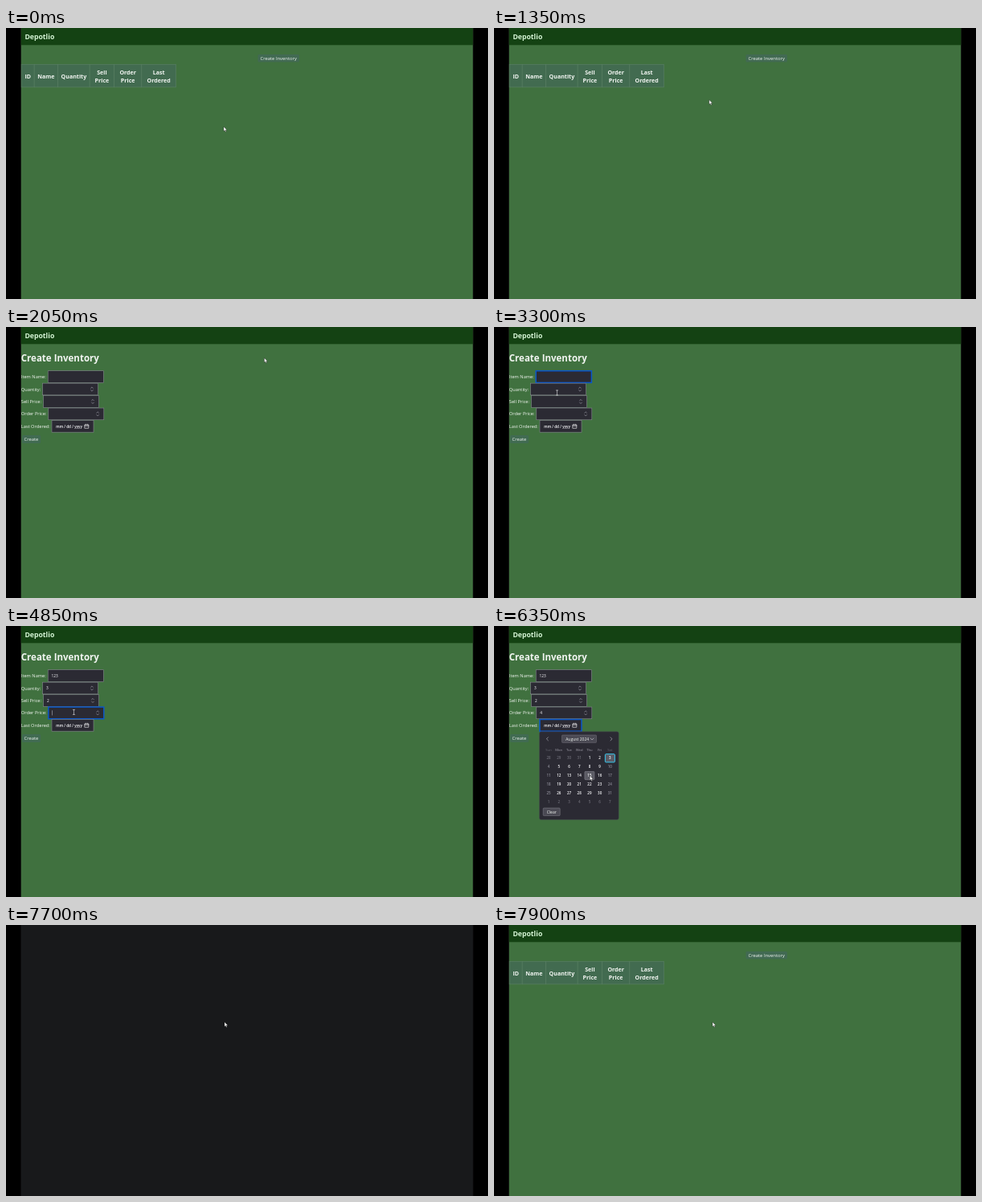
An HTML page for the animation above (8000 ms loop, 600 px wide and 338 px high).

```html
<!DOCTYPE html>
<html lang="en">
<head>
<meta charset="utf-8">
<title>Inventory form</title>
<style>
  html, body { margin: 0; width: 100%; height: 100%; overflow: hidden; background: #000; }
  svg { display: block; width: 100%; height: 100%; }
  text { font-family: "Open Sans", "Noto Sans", sans-serif; fill: #f1f5f1; }
  .bold { font-weight: 700; }
  .mid { text-anchor: middle; }
  .label { font-size: 5.7px; }
  .button { font-size: 5.85px; }
  .value { font-size: 4.75px; fill: #fbfbfe; }
  .date { font-size: 4.6px; font-weight: 600; fill: #fbfbfe; }
  .th { font-size: 7.1px; font-weight: 700; }
  .day { font-size: 4.5px; font-weight: 600; }
  .line { fill: none; stroke-linecap: round; stroke-linejoin: round; }
</style>
</head>
<body>
<svg id="stage" viewBox="0 0 600 338"></svg>
<script>
const LOOP = 8000, STEP = 50;
const NS = "http://www.w3.org/2000/svg";
const stage = document.getElementById("stage");

function add(parent, tag, attrs = {}, content) {
  const node = document.createElementNS(NS, tag);
  for (const key in attrs) node.setAttribute(key, attrs[key]);
  if (content !== undefined) node.textContent = content;
  parent.appendChild(node);
  return node;
}
const group = parent => add(parent, "g");
const rect = (parent, x, y, width, height, fill, more = {}) =>
  add(parent, "rect", { x, y, width, height, fill, ...more });
const text = (parent, x, y, content, cls, more = {}) =>
  add(parent, "text", { x, y, class: cls, ...more }, content);
const line = (parent, d, stroke, width) =>
  add(parent, "path", { d, stroke, "stroke-width": width, class: "line" });
const show = (node, on) => node.setAttribute("display", on ? "inline" : "none");

rect(stage, 0, 0, 600, 338, "#000");
const blank = rect(stage, 18.5, 0, 563, 338, "#1a191b");

// Shared page
const page = group(stage);
rect(page, 18.8, 0, 562.4, 338, "#40713f");
rect(page, 18.8, 0, 562.4, 21.3, "#144213");
text(page, 23.4, 13.8, "Depotlio", "bold", { "font-size": 8.7, style: "fill:#d5f5d5" });

// List page
const list = group(page);
rect(list, 313.5, 33, 51.5, 9.6, "#426a53", { rx: 1.5 });
text(list, 339.2, 39.9, "Create Inventory", "button mid");
const edges = [19.2, 35.2, 64.6, 104.2, 134.6, 168.8, 211.4];
["ID", "Name", "Quantity", "Sell Price", "Order Price", "Last Ordered"].forEach((name, i) => {
  const x = edges[i], w = edges[i + 1] - x, words = name.split(" ");
  rect(list, x, 45.4, w, 28.4, "#426b50", { stroke: "#577d62", "stroke-width": 0.7 });
  words.forEach((word, k) =>
    text(list, x + w / 2, words.length > 1 ? 57.5 + k * 10.2 : 62.6, word, "th mid"));
});

// Form page
const form = group(page);
text(form, 18.8, 43, "Create Inventory", "bold", { "font-size": 11.5 });

const fields = [
  { label: "Item Name:", x: 52.2, w: 69.2 },
  { label: "Quantity:", x: 45.6, w: 69, spin: true },
  { label: "Sell Price:", x: 46.6, w: 69, spin: true },
  { label: "Order Price:", x: 52.8, w: 69, spin: true },
  { label: "Last Ordered:", x: 57, w: 52, date: true }
];
fields.forEach((f, i) => {
  f.y = 54.7 + i * 15.45;
  f.h = 14.7;
  text(form, 18.8, f.y + 9.4, f.label, "label");
  f.box = rect(form, f.x, f.y, f.w, f.h, "#2b2a33");
  f.text = text(form, f.x + (f.date ? 5.3 : 4.4), f.y + 9.1, "", f.date ? "date" : "value");
  const right = f.x + f.w - 7.6, mid = f.y + f.h / 2;
  if (f.spin) line(form, `M${right - 1.4} ${mid - 1.2}l1.4 -1.4l1.4 1.4m-2.8 2.4l1.4 1.4l1.4 -1.4`, "#a5a5b0", 0.6);
  if (f.date) line(form, `M${right - 3.2} ${mid - 1.9}h4.6v4.3h-4.6zm0 1.3h4.6m-3.4 -2v0.7m2.2 -0.7v0.7`, "#fbfbfe", 0.6);
  f.caret = rect(form, 0, f.y + 4.2, 0.5, 6.2, "#c8c8d0");
});
rect(form, 20, 135, 23.2, 10, "#416b52", { rx: 1.5 });
text(form, 31.4, 142.1, "Create", "button mid");

// Date picker
const picker = group(form);
const colX = c => 68 + c * 12.73, rowY = r => 164.8 + r * 10.88;
rect(picker, 56.6, 131.8, 98.6, 109.8, "#2b2a33", { rx: 2, stroke: "#45444e", "stroke-width": 0.5 });
rect(picker, 84.5, 136, 43, 9.6, "#4a4953", { rx: 1, stroke: "#74737d", "stroke-width": 0.5 });
text(picker, 89.2, 142.6, "August 2024", "", { "font-size": 5 });
line(picker, "M120.2 140.1l1.9 1.9l1.9 -1.9", "#dcdce2", 0.6);
line(picker, "M67.4 138.8l-2 2l2 2M145 138.8l2 2l-2 2", "#c8c8d0", 0.6);
["Sun", "Mon", "Tue", "Wed", "Thu", "Fri", "Sat"].forEach((name, c) =>
  text(picker, colX(c), 155.5, name, "mid", { "font-size": 4.2, style: `fill:${c % 6 ? "#a09faa" : "#66656f"}` }));
const cell = (c, r, fill, stroke, width) =>
  rect(picker, colX(c) - 6, rowY(r) - 5.1, 12, 10.2, fill, { rx: 1, stroke, "stroke-width": width });
cell(6, 0, "#5b5b66", "#35c8ee", 1);
const hover = cell(0, 0, "#5b5b64", "#85848f", 0.6);
for (let i = 0; i < 42; i++) {
  const c = i % 7, r = Math.floor(i / 7), n = i - 3;
  const day = n < 1 ? n + 31 : n > 31 ? n - 31 : n;
  const bright = n === 3 || (n > 0 && n < 32 && c % 6);
  const dim = n < 1 || n > 31 ? "#6b6a74" : "#8b8a95";
  text(picker, colX(c), rowY(r) + 1.6, day, "day mid", { style: `fill:${bright ? "#fbfbfe" : dim}` });
}
rect(picker, 61.2, 227, 21, 9.6, "#4a4953", { rx: 1, stroke: "#85848f", "stroke-width": 0.5 });
text(picker, 71.7, 233.6, "Clear", "mid", { "font-size": 5 });

// Pointers
const arrow = add(stage, "path", {
  d: "M0 0V5.7L1.3 4.5L2.2 6.6L3.2 6.2L2.3 4.2H4.1Z",
  fill: "#fff", stroke: "#111", "stroke-width": 0.35
});
const beam = line(stage, "M-1.2 -3H1.2M0 -3V3M-1.2 3H1.2", "#d8d8dc", 0.6);

// Pointer stops: time, x, y
const path = [
  [0, 271, 123], [350, 235.5, 120.4], [1100, 235.5, 120.4], [1700, 321.5, 38.5],
  [2750, 321.5, 38.5], [3050, 78.5, 65], [3250, 78.5, 65], [3300, 78.5, 82],
  [4100, 78.5, 82], [4300, 81, 96], [4650, 81, 96], [4800, 84.5, 107.4],
  [5200, 84.5, 107.4], [5500, 100, 124], [5750, 100, 124], [6050, 170.5, 144.5],
  [6100, 170.5, 144.5], [6350, 119.3, 186.8], [6800, 119.3, 186.8], [7050, 27, 136.3],
  [7250, 27, 136.3], [7450, 272, 121], [LOOP, 272, 121]
];
function pointerAt(t) {
  const i = path.findIndex((p, k) => k > 0 && t <= p[0]);
  const [t0, x0, y0] = path[i - 1], [t1, x1, y1] = path[i];
  const u = (t - t0) / (t1 - t0), e = u * u * (3 - 2 * u);
  return [x0 + (x1 - x0) * e, y0 + (y1 - y0) * e];
}

// Field states: time and the value from then on
const focusSteps = [[0, -1], [3050, 0], [3800, 1], [4350, 2], [4850, 3], [5550, 4], [7050, -1]];
const valueSteps = [
  [[0, ""], [3500, "1"], [3600, "12"], [3650, "123"]],
  [[0, ""], [4000, "3"]],
  [[0, ""], [4650, "2"]],
  [[0, ""], [5000, "4"]],
  [[0, "mm / dd / yyyy"], [6500, "08 / 15 / 2024"]]
];
const valueAt = (steps, t) => steps.filter(s => s[0] <= t).pop()[1];

function draw(time) {
  const t = Math.floor(time / STEP) * STEP;
  const leaving = t >= 1850 && t < 1950, saving = t >= 7700 && t < 7800;
  const onForm = t >= 1950 && t < 7700;
  const open = t >= 5600 && t < 6500;
  const [x, y] = pointerAt(t);

  blank.setAttribute("fill", saving ? "#18191b" : "#1a191b");
  show(page, !leaving && !saving);
  show(list, !onForm);
  show(form, onForm);
  show(picker, open);

  const focus = valueAt(focusSteps, t);
  let typing = false;
  fields.forEach((f, i) => {
    const value = valueAt(valueSteps[i], t), on = i === focus;
    f.text.textContent = value;
    f.box.setAttribute("stroke", on ? "#0b57c9" : "#85858f");
    f.box.setAttribute("stroke-width", on ? 1.5 : 0.6);
    f.caret.setAttribute("x", f.x + 4.5 + value.length * 2.72);
    show(f.caret, on && !f.date && (i > 0 || value));
    const inside = x > f.x && x < f.x + f.w && y > f.y && y < f.y + f.h;
    if (inside && !(f.date && x > 96)) typing = true;
  });

  const c = Math.round((x - colX(0)) / 12.73), r = Math.round((y - rowY(0)) / 10.88);
  const overDay = c >= 0 && c < 7 && r >= 0 && r < 6;
  show(hover, open && overDay);
  hover.setAttribute("x", colX(c) - 6);
  hover.setAttribute("y", rowY(r) - 5.1);

  const useBeam = onForm && !open && typing;
  show(beam, useBeam);
  show(arrow, !useBeam);
  for (const p of [arrow, beam]) p.setAttribute("transform", `translate(${x} ${y})`);
}

const start = performance.now();
function tick() {
  draw((performance.now() - start) % LOOP);
  requestAnimationFrame(tick);
}
tick();
</script>
</body>
</html>
```
